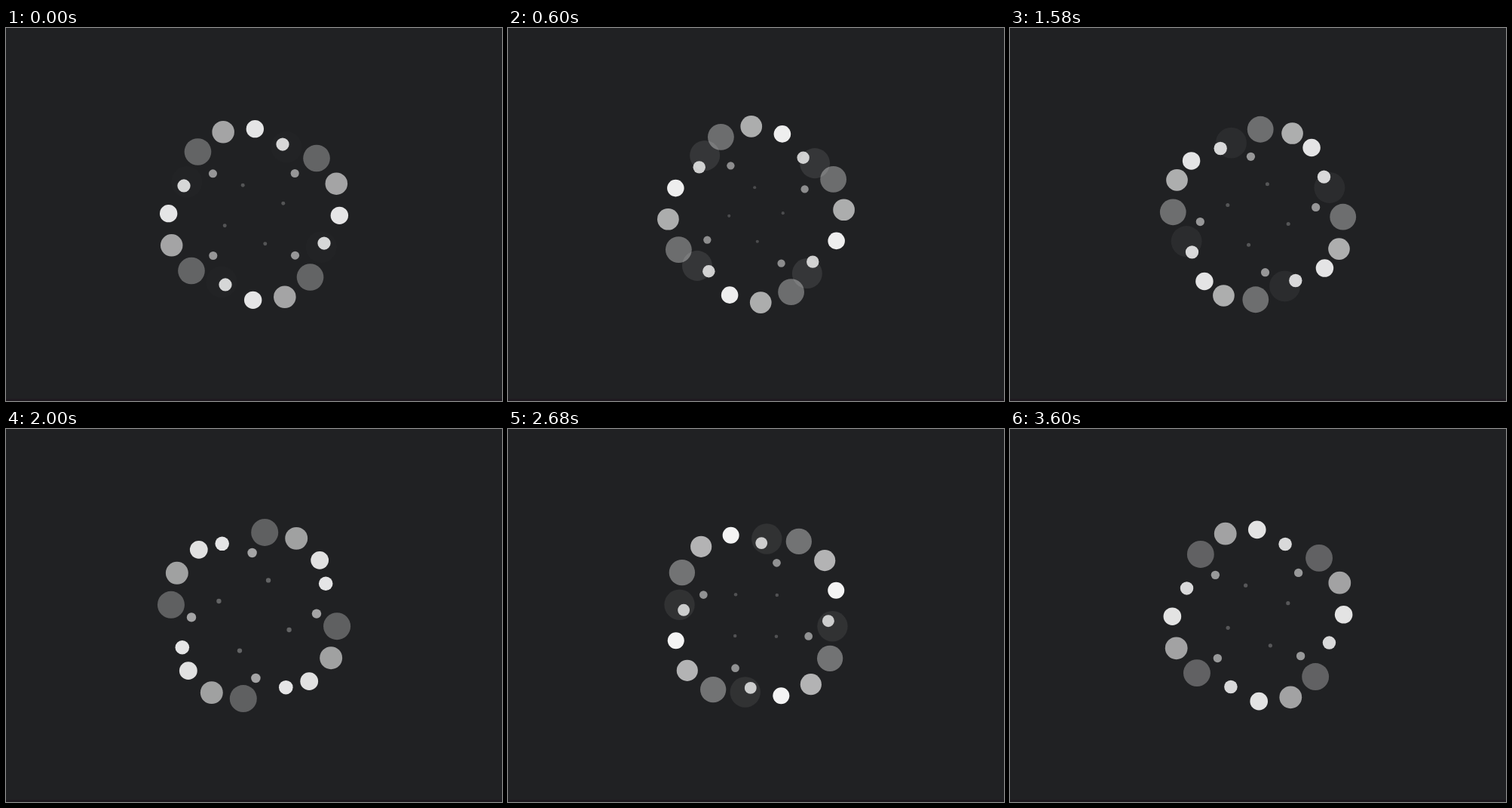
An HTML page with a canvas for the animation above (3.62 s loop, 658 by 494 pixels).

```html
<!DOCTYPE html>
<html>
<head>
<meta charset="utf-8">
<title>Spiral loader</title>
<style>
  html, body { margin: 0; height: 100%; overflow: hidden; background: #202123; }
  canvas { display: block; }
</style>
</head>
<body>
<canvas width="658" height="494"></canvas>
<script>
const ctx = document.querySelector('canvas').getContext('2d');
const LOOP = 3620, STAGGER = 529, START = 430;
const ARMS = 4, PER_ARM = 7, DOTS = ARMS * PER_ARM;
const MAX_RADIUS = 21;

function drawDot(i, time) {
  const age = time - START - (i % PER_ARM) * STAGGER;
  const life = 1 - (((age / LOOP) % 1) + 1) % 1; // 1 = born on the rim, 0 = gone at the centre
  const n = (life - 0.557) / 0.1461;
  const distance = 113.36 + 7.92 * n - 4.78 * n ** 2 + 0.186 * n ** 3;
  const degrees = 52.08 - 34.1 * n + 0.195 * n ** 2 - 0.108 * n ** 3 + i * 360 / DOTS;
  const angle = degrees * Math.PI / 180;

  ctx.globalAlpha = 1 - Math.abs(2 * life - 1);
  ctx.beginPath();
  ctx.arc(329 + distance * Math.sin(angle), 247 - distance * Math.cos(angle),
          MAX_RADIUS * life, 0, 2 * Math.PI);
  ctx.fill();
}

function draw() {
  const time = performance.now() % LOOP;
  ctx.globalAlpha = 1;
  ctx.fillStyle = '#202123';
  ctx.fillRect(0, 0, 658, 494);
  ctx.fillStyle = '#1f1a20';
  ctx.fillRect(0, 491, 658, 3);
  ctx.fillStyle = '#fff';
  for (let i = 0; i < DOTS; i++) drawDot(i, time);
  requestAnimationFrame(draw);
}
draw();
</script>
</body>
</html>
```
